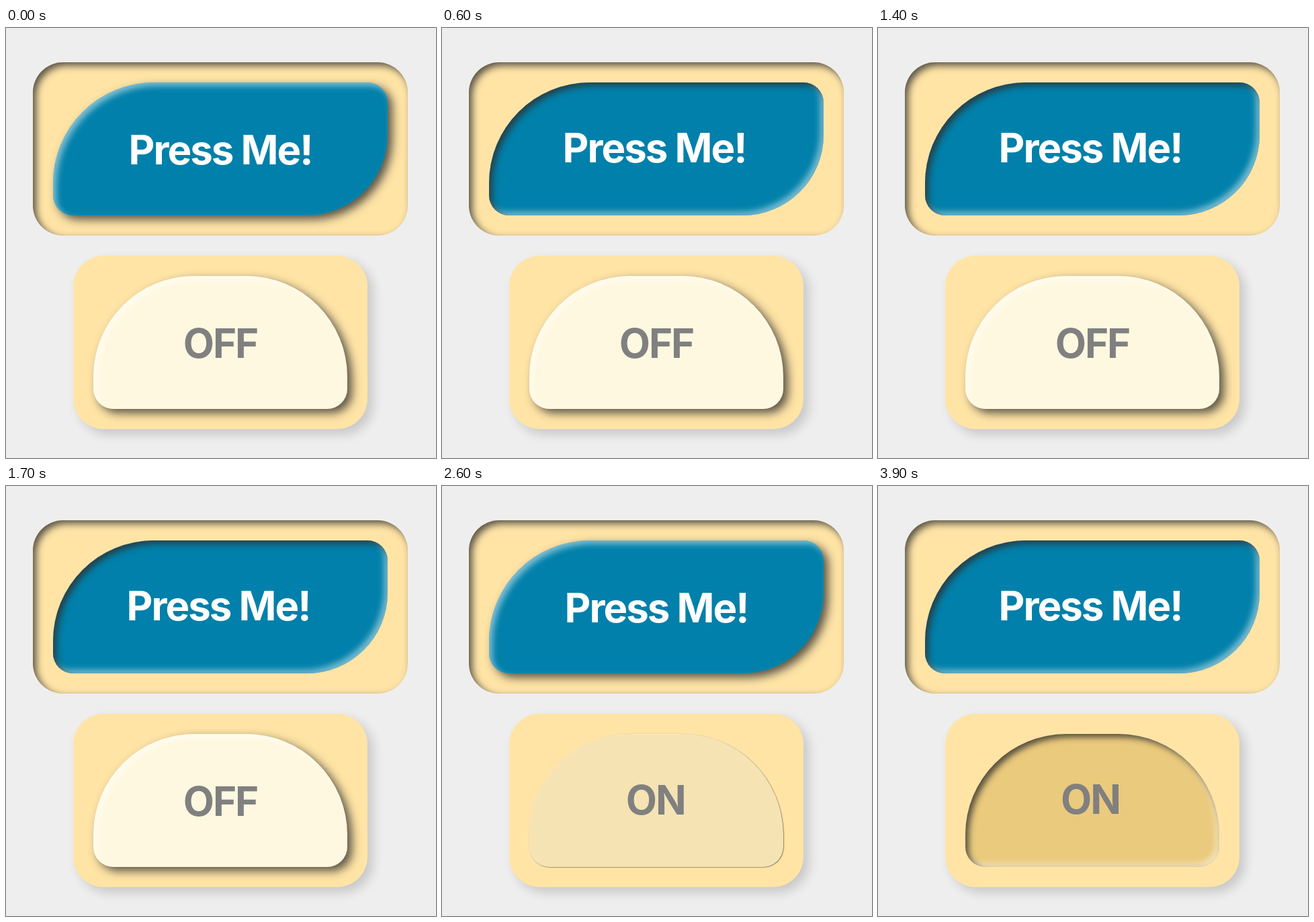
An HTML page with a canvas for the animation above (4000 ms loop, 640x640 px).

```html
<!DOCTYPE html>
<html lang="en">
<head>
<meta charset="utf-8">
<title>Soft buttons</title>
<style>
  html, body { margin: 0; width: 100%; height: 100%; overflow: hidden; background: #eee; }
  canvas { display: block; }
</style>
</head>
<body>
<canvas id="stage" width="640" height="640"></canvas>
<script>
const ctx = document.getElementById('stage').getContext('2d');
const LOOP = 4000;
const PRESS_TIME = 200;
const FAR = 3000; // keeps shadow casters off the stage

const dark = a => `rgba(48,48,48,${a})`;
const light = a => `rgba(255,255,255,${a})`;
const mix = (a, b, p) => `rgb(${a.map((v, i) => Math.round(v + (b[i] - v) * p))})`;

const PAGE = '#eee';
const PANEL = '#ffe4a6';
const BLUE = '#0080aa';
const CREAM = [255, 248, 224];
const SAND = [234, 202, 124];

// Each time flips the button between raised (0) and pressed (1).
const topFlips = [50, 700, 1150, 1950, 3050];
const toggleFlips = [2510];

function pressAt(t, flips) {
  return flips.reduce((p, start, i) => {
    const k = Math.min(1, Math.max(0, (t - start) / PRESS_TIME));
    return p + (i % 2 ? -k : k);
  }, 0);
}

function shape(x, y, w, h, radii) {
  const path = new Path2D();
  path.roundRect(x, y, w, h, radii);
  return path;
}

function castShadow(path, dx, dy, blur, color, rule = 'nonzero') {
  ctx.save();
  ctx.translate(-FAR, 0);
  ctx.shadowColor = color;
  ctx.shadowBlur = blur;
  ctx.shadowOffsetX = FAR + dx;
  ctx.shadowOffsetY = dy;
  ctx.fillStyle = '#000';
  ctx.fill(path, rule);
  ctx.restore();
}

function insetShadow(path, offset, blur, color) {
  const frame = new Path2D();
  frame.rect(-200, -200, 1040, 1040);
  frame.addPath(path);
  ctx.save();
  ctx.clip(path);
  castShadow(frame, offset, offset, blur, color, 'evenodd');
  ctx.restore();
}

function fill(path, color) {
  ctx.fillStyle = color;
  ctx.fill(path);
}

function drawButton(path, color, p) {
  const lift = 1 - 2 * p;
  const d = Math.abs(lift);
  if (lift > 0) castShadow(path, 7 * d, 6 * d, 14 * d, dark(0.8));
  fill(path, color);
  if (lift > 0) {
    insetShadow(path, 5 * d, 10 * d, light(0.5));
  } else if (lift < 0) {
    insetShadow(path, -5 * d, 10 * d, light(0.5));
    insetShadow(path, 5 * d, 10 * d, dark(0.8));
  }
}

function drawLabel(text, x, y, p, color) {
  ctx.fillStyle = color;
  ctx.fillText(text, x - 3 * p, y - 3 * p);
}

const topPanel = shape(40, 51, 558, 258, 45);
const lowPanel = shape(100, 339, 438, 258, 45);
const leaf = shape(70, 81, 498, 198, [150, 30, 120, 30]);
const dome = shape(130, 369, 378, 198, [150, 150, 30, 30]);

function draw(t) {
  const press = pressAt(t, topFlips);
  const toggle = pressAt(t, toggleFlips);

  ctx.fillStyle = PAGE;
  ctx.fillRect(0, 0, 640, 640);

  fill(topPanel, PANEL);
  insetShadow(topPanel, 5, 11, dark(0.8));
  drawButton(leaf, BLUE, press);

  castShadow(lowPanel, 8, 8, 16, 'rgba(0,0,0,0.16)');
  fill(lowPanel, PANEL);
  drawButton(dome, mix(CREAM, SAND, toggle), toggle);

  ctx.font = '700 60px Inter, sans-serif';
  ctx.letterSpacing = '-2px';
  ctx.textAlign = 'center';
  ctx.textBaseline = 'alphabetic';
  drawLabel('Press Me!', 319, 202.5, press, '#fff');
  drawLabel(toggle > 0 ? 'ON' : 'OFF', 319, 490.5, toggle, '#808080');
}

const begin = performance.now();
function tick() {
  draw((performance.now() - begin) % LOOP);
  requestAnimationFrame(tick);
}
tick();
</script>
</body>
</html>
```
